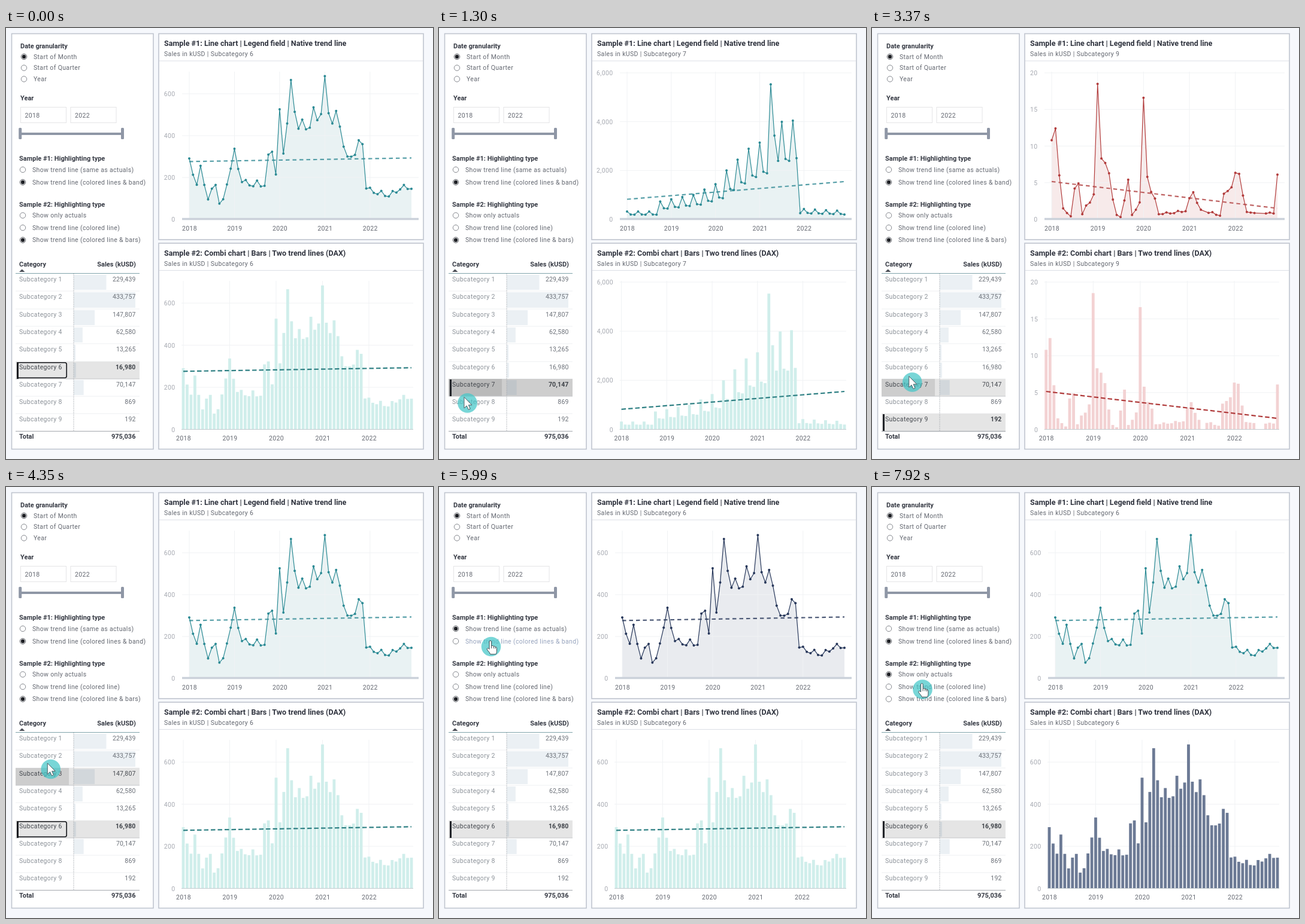
An HTML page that plays this animation: 713 by 721 pixels, repeating every 8000 ms.

```html
<!DOCTYPE html>
<html lang="en">
<head>
<meta charset="utf-8">
<title>Sales dashboard</title>
<style>
html, body { margin: 0; width: 100%; height: 100%; overflow: hidden; background: #f6f8fc; }
svg { display: block; font: 10.5px Roboto, "Open Sans", sans-serif; letter-spacing: .35px; }
text { fill: #636770; white-space: pre; }
.title { font-size: 12.55px; font-weight: 700; fill: #30343f; letter-spacing: 0; }
.head { font-size: 11px; font-weight: 700; fill: #353943; letter-spacing: 0; }
.num { letter-spacing: .15px; fill: #6b7078; }
.dim { fill: #8c9299; }
.tick { fill: #a6a9b1; }
.dark { fill: #45494f; }
.bold { font-weight: 700; fill: #3f4349; }
.end { text-anchor: end; }
.mid { text-anchor: middle; }
.lit { fill: #96a3bd; }
</style>
</head>
<body>
<svg width="713" height="721" viewBox="0 0 713 721">
  <g id="view"></g>
  <g id="cursor">
    <circle r="16.3" fill="#45c6c8" fill-opacity=".72"/>
    <circle id="pulse" cx="-5" cy="-9" r="15" fill="#f6f02c" fill-opacity=".7"/>
    <path id="arrow" transform="translate(-5.5 -10)" d="M0 0V18.5L4.3 14.6L7.2 21L10.2 19.7L7.4 13.4H13Z" fill="#fff" stroke="#4b5c62"/>
    <path id="hand" d="M-3-9q2-2 3.6 0v8l1-.5q2-.6 2.6 1q2-.8 2.8 1q2-.3 2.4 1.8v6q0 2-1.6 4.5h-9q-1-2.8-5-7q-1.6-2.6.6-3.2q1.4 0 2.6 1.8zM.6-1v4M4.2-.5v3.5M7 .5v3" fill="#fff" stroke="#3c4a50"/>
  </g>
</svg>
<script>
const $ = id => document.getElementById(id);
const months = [...Array(60).keys()];

// Straight lines through key points, with a quarterly ripple that fades out at the points.
function through(points, x, ripple = 0) {
  const n = Math.max(1, points.findIndex(p => p[0] >= x));
  const [x0, y0] = points[n - 1], [x1, y1] = points[n];
  const k = (x - x0) / (x1 - x0);
  return (y0 + (y1 - y0) * k) * (1 + ripple * Math.cos(x * Math.PI / 1.5) * 4 * k * (1 - k));
}

// A step up in 2020, a step down at the end of 2021.
const plateau = [[0, 291], [2, 165], [3, 256], [5, 95], [7, 164], [8, 75], [9, 96], [12, 337], [14, 178],
  [20, 160], [21, 309], [22, 323], [23, 214], [24, 526], [25, 314], [27, 666], [29, 433], [35, 503],
  [36, 684], [37, 507], [40, 443], [42, 300], [46, 359], [47, 147], [53, 109], [57, 164], [59, 146]];

// The first month of each quarter peaks, the other two stay near 60 % of it.
const quarters = [[0, 320], [2, 320], [3, 730], [6, 1000], [8, 1440], [9, 2000], [11, 2890],
  [12, 3140], [13, 5530], [14, 3990], [15, 4040], [16, 420], [20, 330]];
function quarterly(i) {
  const q = Math.floor(i / 3), peak = through(quarters, q);
  return [peak, .62 * peak, .6 * Math.min(peak, through(quarters, q + 1))][i % 3];
}

// Yearly peaks from September 2019 with a fixed decay; each is announced by half its height.
const peaks = [94, 71, 51, 23];
const decay = [1, .51, .33, .19, .35, .21, .27, .21, .18, .15, .1];
function seasonal(i) {
  if (i < 13) return i < 7 ? .6 : 1.2;
  if (i < 20) return i < 19 ? 0 : 1.1;
  const year = Math.floor((i - 20) / 12), m = (i - 20) % 12;
  return m < 11 ? peaks[year] * decay[m] : peaks[year + 1] / 2;
}

// January peaks that die out; a few months have no sales.
const fading = [[0, 10.8], [1, 12.4], [2, 6], [3, 1.5], [5, .4], [6, 4.2], [7, 4.9], [8, .7], [11, 3.4],
  [12, 18.5], [13, 8.3], [14, 7.7], [17, .6], [18, .3], [20, 5.4], [21, .6], [23, 2.3], [24, 16.6],
  [25, 5.8], [28, .7], [35, 1.1], [37, 3.7], [39, 1.3], [44, .5], [45, 3.5], [49, 6.2], [51, 1], [58, .8], [59, 6.1]];

const chart = (value, max, tick, trend, x1, x2, down) => ({ data: months.map(value), max, tick, trend, x1, x2, down });
const charts = {
  6: chart(i => through(plateau, i, .13), 700, 200, [276, 293], 306, 296),
  7: chart(quarterly, 6000, 2000, [820, 1545], 314, 304.6),
  8: chart(seasonal, 100, 50, [12.4, 20.2], 306, 296),
  9: chart(i => [40, 54, 55].includes(i) ? 0 : through(fading, i, .2), 20, 5, [5.15, 1.5], 300, 290.7, true)
};
const teal = { line: '#2b8a94', area: '#e9f2f3', trend: '#559ea7', bar: '#d0eeeb', trend2: '#2f8084' };
const red = { line: '#b23c3c', area: '#f7eaea', trend: '#bf6464', bar: '#f3d2d3', trend2: '#b03b3b' };
const navy = { line: '#27375a', area: '#e9ebef', trend: '#4c5976' };

const totals = [229439, 433757, 147807, 62580, 13265, 16980, 70147, 869, 192];
const rowTop = i => Math.round(411 + 29.3 * i);

const fmt = n => n.toLocaleString('en-US');
const text = (x, y, s, cls = '') => `<text x="${x}" y="${y}" class="${cls}">${s}</text>`;
const rect = (x, y, w, h, fill, more = '') =>
  `<rect x="${x}" y="${y}" width="${w}" height="${h}" fill="${fill}" ${more}/>`;
const line = (x1, y1, x2, y2, color, width = 1, more = '') =>
  `<path d="M${x1} ${y1}L${x2} ${y2}" fill="none" stroke="${color}" stroke-width="${width}" ${more}/>`;
const panel = (x, y, w, h) => rect(x, y, w, h, '#fff', 'stroke="#c0c5cf" stroke-width="1.6"');

function radios(x, top, gap, labels, on, hotY) {
  return labels.map((label, i) => {
    const y = top + gap * i, picked = i === on, lit = !picked && Math.abs(hotY - y) < 7;
    return `<circle cx="${x}" cy="${y}" r="4.7" fill="#fff" stroke="${picked ? '#55585e' : '#85888e'}"/>` +
      (picked ? `<circle cx="${x}" cy="${y}" r="3.2" fill="#1d1f24"/>` : '') +
      text(x + 16, y + 3.5, label, lit ? 'lit' : '');
  }).join('');
}

function filters(s, hotY) {
  const band = 'Show trend line (colored line';
  return panel(9.5, 9.5, 236.5, 695) +
    text(24, 34, 'Date granularity', 'head') +
    radios(30, 48, 18.7, ['Start of Month', 'Start of Quarter', 'Year'], 0) +
    text(24, 121, 'Year', 'head') +
    [24.5, 108].map((x, i) => rect(x, 132.5, 76, 26, '#fff', 'stroke="#e4e4e6"') +
      text(x + 7, 149.5, i ? 2022 : 2018)).join('') +
    line(24, 177, 195, 177, '#8f97a6', 4) +
    [21.2, 192].map(x => rect(x, 167, 5, 19, '#8f97a6', 'rx="1.5"')).join('') +
    text(22, 222, 'Sample #1: Highlighting type', 'head') +
    radios(28, 237, 21, ['Show trend line (same as actuals)', band + 's &amp; band)'], s.style1, hotY) +
    text(22, 299, 'Sample #2: Highlighting type', 'head') +
    radios(28, 313.5, 20.6, ['Show only actuals', band + ')', band + ' &amp; bars)'], s.style2, hotY);
}

function table(s, hotY, focus) {
  let out = text(22, 399, 'Category', 'head') + text(217, 399, 'Sales (kUSD)', 'head end') +
    '<path d="M22 408L26.7 403.5L31.5 408Z" fill="#4a4d55"/>';
  totals.forEach((n, i) => {
    const id = i + 1, top = rowTop(i), end = rowTop(id), h = end - top;
    const sel = s.sel === id, hover = hotY >= top && hotY < end, active = sel || hover;
    if (active) out += rect(16, top, 207, h, sel && hover ? '#cecece' : '#e5e5e5');
    if (hover) out += rect(16, top, 89, h, sel ? '#bababa' : '#cdcdcd');
    out += rect(113, top + 2, n / 433757 * 103, h - 4, active ? '#8fa3b838' : '#ebf0f4') +
      line(16, end, 223, end, active ? '#c4c6c9' : '#eef0f2');
    if (sel) out += rect(18, top + 1, 3, h - 1, '#202328');
    out += text(22, top + 12.5, 'Subcategory ' + id, active ? 'dark' : 'dim') +
      text(216.5, top + 12.5, fmt(n), 'num end ' + (sel ? 'bold' : hover ? 'dark' : ''));
  });
  return out + line(113, 411, 113, 674, '#a4a8ae', 1, 'stroke-dasharray="1.5 1.5"') +
    line(16, 410.5, 223, 410.5, '#7fa3aa') + line(16, 674.5, 223, 674.5, '#a9adb2') +
    text(22, 687, 'Total', 'head') + text(216.5, 687, fmt(975036), 'head end') +
    (focus ? rect(18.8, 559.8, 82.4, 25.4, 'none', 'rx="3" stroke="#15171b" stroke-width="1.6"') : '');
}

function axes(c, x0, step, left, right, labelX, base, height) {
  let out = '';
  for (let v = 0; v <= c.max; v += c.tick) {
    const y = base - v / c.max * height;
    out += line(left, y, right, y, '#f0f2f4') + text(labelX, y + 4, fmt(v), 'tick end');
  }
  for (let k = 0; k < 5; k++) {
    const x = x0 + 12 * k * step;
    out += line(x, base - height - 2, x, base, '#f0f2f4') + text(x + .5, base + 18.5, 2018 + k, 'mid');
  }
  return out;
}

function heading(y, title, cat) {
  return panel(255, y, 442, 344.5) + line(256, y + 45.5, 696, y + 45.5, '#dcdfe6') +
    text(264, y + 20.5, title, 'title') +
    text(264, y + 37.5, 'Sales in kUSD | Subcategory ' + cat);
}

function lineChart(s) {
  const c = charts[s.sel], color = s.style1 === 0 ? navy : c.down ? red : teal;
  const base = 320, height = 245, step = (677 - c.x1) / 59;
  const y = v => base - v / c.max * height;
  const pts = c.data.map((v, i) => [c.x1 + i * step, y(v)]).filter((p, i) => c.data[i]);
  const path = pts.map(p => p.map(n => n.toFixed(1)).join(' ')).join('L');
  return heading(9.5, 'Sample #1: Line chart | Legend field | Native trend line', s.sel) +
    `<path d="M${c.x1} ${base}L${path}L677 ${base}Z" fill="${color.area}"/>` +
    axes(c, c.x1, step, c.x1 - 12, 689, c.x1 - 23.5, base, height) +
    line(c.x1 - 12, base - .5, 689, base - .5, '#cbd1da', 3.5) +
    line(c.x1, y(c.trend[0]), 677, y(c.trend[1]), color.trend, 2.2, 'stroke-dasharray="6.5 5"') +
    `<path d="M${path}" fill="none" stroke="${color.line}" stroke-width="1.2" stroke-linejoin="round"/>` +
    pts.map(([x, py]) => `<circle cx="${x}" cy="${py}" r="2" fill="${color.line}"/>`).join('');
}

function barChart(s) {
  const c = charts[s.sel], color = c.down ? red : teal, plain = s.style2 === 0;
  const base = 671.5, height = 246.5, step = (677 - c.x2) / 59;
  const y = v => base - v / c.max * height;
  return heading(360, 'Sample #2: Combi chart | Bars | Two trend lines (DAX)', s.sel) +
    axes(c, c.x2, step, c.x2 - 3, 680, c.x2 - 13.5, base, height) +
    c.data.map((v, i) => rect(c.x2 + i * step - 2.4, y(v), 4.8, base - y(v), plain ? '#6c7a95' : color.bar)).join('') +
    line(c.x2 - 3, base, 680, base, '#c3cbcf') +
    (plain ? '' : line(c.x2, y(c.trend[0]), 677, y(c.trend[1]), color.trend2, 2.2, 'stroke-dasharray="7.5 4"'));
}

// Clicks: time and what they choose. The filters answer after a pause, the charts a little later.
const initial = { sel: 6, style1: 1, style2: 2 };
const clicks = [
  [560, { sel: 7 }], [1520, { sel: 8 }], [2290, { sel: 9 }], [3500, { sel: 6 }],
  [4740, { style1: 0 }], [6160, { style1: 1 }], [6920, { style2: 0 }]
];
const filterLag = 250, chartLag = 360, hoverLag = 20, pulseTime = 310;
const stateAt = t => Object.assign({}, initial, ...clicks.filter(c => c[0] <= t).map(c => c[1]));

// Pointer glides: start, duration, destination.
const enter = 320;
const glides = [
  [enter, 220, 45, 598], [1190, 136, 48, 634], [2180, 110, 56, 660], [3090, 350, 70, 576],
  [4240, 351, 85, 247], [5770, 220, 87, 267], [6740, 220, 85, 324], [7810, 110, 84.5, 338.5]
];
function pointer(t) {
  let x = 8, y = 606;
  for (const [start, span, toX, toY] of glides) {
    const k = Math.min(1, Math.max(0, (t - start) / span));
    x += (toX - x) * k;
    y += (toY - y) * k;
  }
  return [x, y];
}

const show = (el, on) => el.setAttribute('visibility', on ? 'visible' : 'hidden');

function draw(t) {
  const visible = t >= enter, [x, y] = pointer(t), overRadio = y < 380;
  const hotY = visible ? pointer(t - hoverLag)[1] - 9 : -99;
  const focus = t < 810 || (t >= 4030 && t < 4990);
  const s = stateAt(t - filterLag), late = stateAt(t - chartLag);
  $('view').innerHTML = filters(s, hotY) + table(s, hotY, focus) + lineChart(late) + barChart(late);
  $('cursor').setAttribute('transform', `translate(${x} ${y})`);
  show($('cursor'), visible);
  $('cursor').style.display = visible ? '' : 'none';
  show($('arrow'), !overRadio);
  show($('hand'), overRadio);
  show($('pulse'), clicks.some(c => t >= c[0] && t < c[0] + pulseTime));
}

const begin = performance.now();
function tick() {
  draw((performance.now() - begin) % 8000);
  requestAnimationFrame(tick);
}
tick();
</script>
</body>
</html>
```
